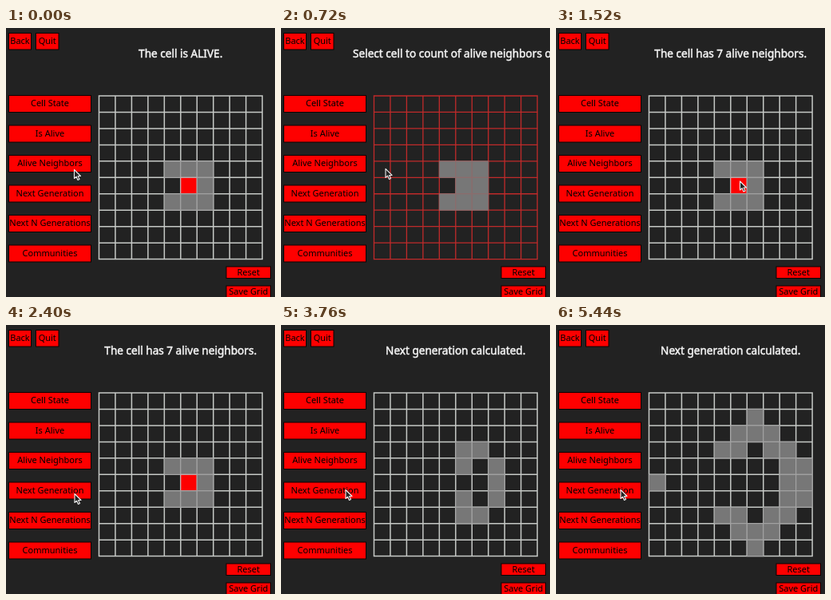
Recreate the animation shown at these times as an HTML page. Size 337x337 px, loop 5520 ms.

```html
<!DOCTYPE html>
<html lang="en">
<head>
<meta charset="utf-8">
<title>Game of Life</title>
<style>
  html, body { margin: 0; width: 100%; height: 100%; overflow: hidden; background: #222; }
  svg { display: block; width: 100vw; height: 100vh; }
  text { font-family: "Noto Sans", "Open Sans", sans-serif; text-anchor: middle; }
  .button rect { fill: #fe0000; stroke: #100; }
  .button text { font-size: 11px; }
  #title { font-size: 13.6px; fill: #f4f4f4; stroke: #f4f4f4; stroke-width: .5; }
  #lines { fill: none; stroke: #c6c9c6; stroke-width: 1.5; }
  .cell { fill: #777; stroke: #a4a4a4; stroke-width: 1.1; }
  .cell.picked { fill: #fe0000; stroke: #c8b4b4; }
  .picking #lines { stroke: #c02a2a; stroke-width: 1.3; }
  .picking .cell { stroke: #8c6c6c; }
  #pointer { fill: #222; stroke: #eee; stroke-width: 1.1; stroke-linejoin: round; }
</style>
</head>
<body>
<svg id="stage" viewBox="0 0 337 337">
  <rect width="337" height="337" fill="#222"/>
  <g id="buttons"></g>
  <text id="title" y="37"></text>
  <path id="lines"/>
  <g id="cells"></g>
  <path id="pointer" d="M0 0V11L2.6 8.7L4.5 13L6.5 12.1L4.6 8H8Z"/>
</svg>
<script>
const LOOP = 5520, SIZE = 10, LEFT = 116.5, TOP = 85, STEP = 20.46;
const NS = 'http://www.w3.org/2000/svg';
const byId = id => document.getElementById(id);

function add(parent, tag, attrs, text) {
  const el = document.createElementNS(NS, tag);
  for (const key in attrs) el.setAttribute(key, attrs[key]);
  if (text) el.textContent = text;
  return parent.appendChild(el);
}

function addButton(label, x, y, w, h, baseline) {
  const g = add(byId('buttons'), 'g', { class: 'button' });
  add(g, 'rect', { x, y, width: w, height: h });
  add(g, 'text', { x: x + w / 2, y: y + baseline }, label);
}

addButton('Back', 3.5, 6.5, 28, 20.5, 13.5);
addButton('Quit', 37.5, 6.5, 28.5, 20.5, 13.5);
['Cell State', 'Is Alive', 'Alive Neighbors', 'Next Generation', 'Next N Generations', 'Communities']
  .forEach((label, i) => addButton(label, 3.5, 84.5 + i * 37.5, 103, 21, 13.7));
addButton('Reset', 276, 299, 55.5, 14.5, 10.5);
addButton('Save Grid', 276, 323, 55.5, 14.5, 10.5);

let path = '';
for (let i = 0; i <= SIZE; i++) {
  const d = i * STEP, span = SIZE * STEP;
  path += `M${LEFT + d} ${TOP - .7}v${span + 1.4}M${LEFT - .7} ${TOP + d}h${span + 1.4}`;
}
byId('lines').setAttribute('d', path);

// The board wraps around at its edges.
function nextBoard(board) {
  return board.map((alive, i) => {
    const x = i % SIZE, y = Math.floor(i / SIZE);
    let n = 0;
    for (let dy = -1; dy <= 1; dy++)
      for (let dx = -1; dx <= 1; dx++)
        if (dx || dy) n += board[(y + dy + SIZE) % SIZE * SIZE + (x + dx + SIZE) % SIZE];
    return n === 3 || (alive && n === 2) ? 1 : 0;
  });
}

const start = Array(SIZE * SIZE).fill(0);
[44, 45, 46, 55, 56, 64, 65, 66].forEach(i => start[i] = 1);
const births = [3040, 3360, 3600, 3920, 4160, 4400, 4640, 4960, 5200];
const boards = [start];
births.forEach(() => boards.push(nextBoard(boards[boards.length - 1])));

const PICKED = 55;
const cells = start.map((_, i) => add(byId('cells'), 'rect', {
  class: i === PICKED ? 'cell picked' : 'cell',
  x: LEFT + i % SIZE * STEP, y: TOP + Math.floor(i / SIZE) * STEP,
  width: STEP, height: STEP
}));

const messages = [
  [0, 'The cell is ALIVE.'],
  [320, 'Select cell to count of alive neighbors of'],
  [1120, 'The cell has 7 alive neighbors.'],
  [births[0], 'Next generation calculated.']
];

// time, x, y
const pointerPath = [
  [0, 85.5, 177.5], [240, 77, 168], [560, 77, 168], [960, 230.5, 192],
  [1640, 230.5, 192], [2240, 86, 211.5], [2480, 86, 211.5], [2800, 81, 206.5], [LOOP, 81, 206.5]
];

function pointerAt(t) {
  const k = pointerPath.findIndex(p => p[0] > t);
  const [t0, x0, y0] = pointerPath[k - 1], [t1, x1, y1] = pointerPath[k];
  const u = (t - t0) / (t1 - t0), e = u * u * (3 - 2 * u);
  return [x0 + (x1 - x0) * e, y0 + (y1 - y0) * e];
}

function draw(now) {
  const t = Math.floor(now % LOOP / 80) * 80;
  const stage = messages.filter(m => m[0] <= t).length - 1;
  const picking = stage === 1;
  const title = byId('title');
  title.textContent = messages[stage][1];
  title.setAttribute('x', picking ? 90 : 218.7);
  title.style.textAnchor = picking ? 'start' : 'middle';
  byId('stage').classList.toggle('picking', picking);

  const generation = births.filter(b => b <= t).length;
  cells.forEach((el, i) => el.style.display = boards[generation][i] ? '' : 'none');
  cells[PICKED].classList.toggle('picked', !picking && generation === 0);

  byId('pointer').setAttribute('transform', `translate(${pointerAt(t)})`);
  requestAnimationFrame(() => draw(performance.now() - begin));
}

const begin = performance.now();
draw(0);
</script>
</body>
</html>
```
